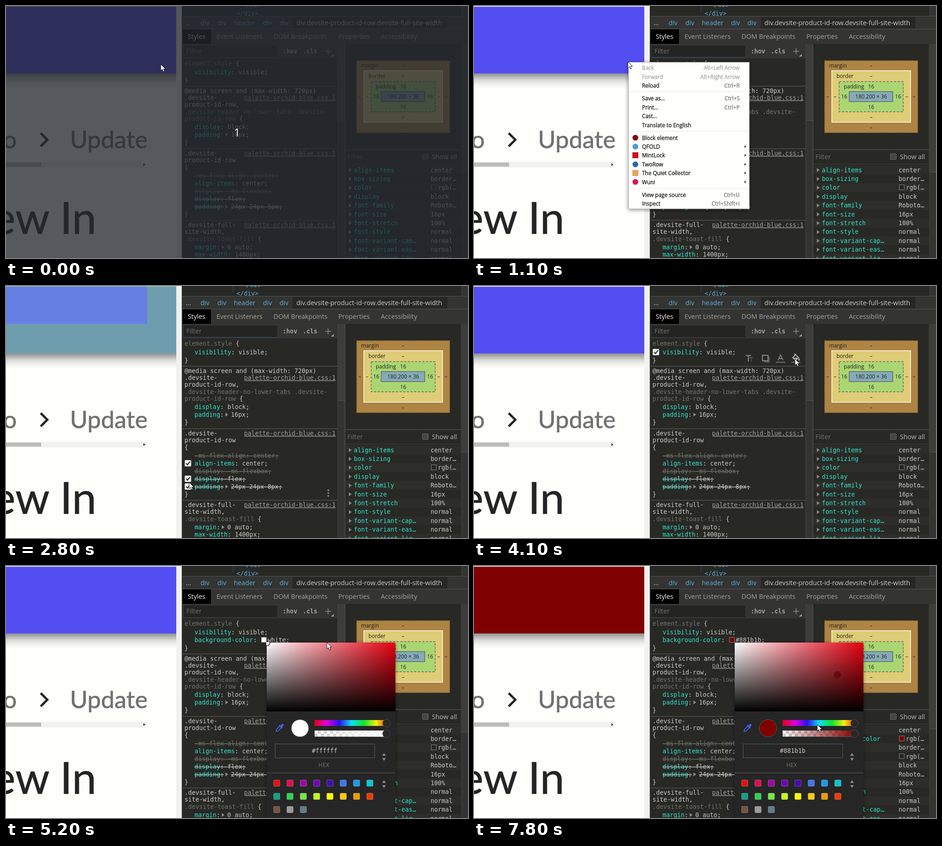
Animation, 1012 px wide and 553 px high, one loop 8 s. Source, as an HTML page:

```html
<!DOCTYPE html>
<html lang="en">
<head>
<meta charset="utf-8">
<title>Picking a background colour</title>
<style>
html, body { margin: 0; width: 100%; height: 100%; overflow: hidden; background: #282825; }
svg { position: fixed; inset: 0; width: 100%; height: 100%; display: block; }
text { white-space: pre; fill: #cbcbc8; }
.ui { font: 14.3px "Open Sans", "Noto Sans", sans-serif; }
.sm { font: 11.7px "Open Sans", "Noto Sans", sans-serif; }
.menu { font: 11.9px "Open Sans", "Noto Sans", sans-serif; stroke-width: .3px; }
.mono { font: 13.33px "DejaVu Sans Mono", monospace; }
.big { font-family: Lato, "Open Sans", sans-serif; stroke-width: .7px; }
.off { fill: #72726f; }
.key { fill: #2ce6ca; }
.val { fill: #c8c8c5; }
.tab { fill: #a3a39f; }
.crumb { fill: #5bb0dd; }
.link { fill: #a0a09c; text-decoration: underline; }
.strike { text-decoration: line-through; }
.box { fill: #222; }
</style>
</head>
<body>
<svg id="stage" viewBox="0 0 1012 553" preserveAspectRatio="none"></svg>
<script>
const BG = '#282825', BAR = '#343432', LINE = '#555552', CHAR = 8.026;
const BLUE = '#524ef1', RED = '#7f0000';

const text = (x, y, s, cls, more = '') => `<text x="${x}" y="${y}" class="${cls}" ${more}>${s}</text>`;
const mid = (x, y, s, cls) => text(x, y, s, cls, 'text-anchor="middle"');
const end = (x, y, s, cls) => text(x, y, s, cls, 'text-anchor="end"');
const rect = (x, y, w, h, fill, more = '') =>
  `<rect x="${x}" y="${y}" width="${w}" height="${h}" fill="${fill}" ${more}/>`;
const circle = (x, y, r, fill, more = '') => `<circle cx="${x}" cy="${y}" r="${r}" fill="${fill}" ${more}/>`;
const path = (d, fill, more = '') => `<path d="${d}" fill="${fill}" ${more}/>`;
const group = (id, body, more = '') => `<g id="${id}" ${more}>${body}</g>`;
const rightTri = (x, y, s, fill) => path(`M${x} ${y - s}l${s * 1.4} ${s}l${-s * 1.4} ${s}z`, fill);
const span = (s, cls) => `<tspan class="${cls}">${s}</tspan>`;
const mono = (x, y, s, cls = '') => text(x, y, s, 'mono ' + cls);
const big = (x, y, s, size, ink, anchor) =>
  text(x, y, s, 'big', `text-anchor="${anchor}" style="font-size:${size}px;fill:${ink};stroke:${ink}"`);

function page() {
  return rect(0, 0, 386, 553, '#fefefb') + rect(373, 0, 13, 553, '#f1f1ee') +
    rect(0, 148, 373, 34, 'url(#shade)') +
    `<rect id="header" x="0" y="1.5" width="373" height="146.5"/>` +
    group('overlay', rect(0, 0, 373, 2, '#a6ccb2') + rect(0, 1.5, 373, 146.5, '#6e9dae') +
      rect(0, 1.5, 309, 81.5, '#667fe3')) +
    big(23.5, 312, 'o', 52, '#717171', 'end') +
    path('M76 279L90.5 293.5L76 308', 'none', 'stroke="#242424" stroke-width="5"') +
    `<g clip-path="url(#crumbs)">${big(140, 312, 'Update', 53, '#717171', 'start')}</g>` +
    rect(0, 342, 308, 12, '#f1f1ef') + rect(0, 343.5, 77, 9, '#bdbdbb') + rightTri(301, 348, 3, '#333') +
    big(198, 500, 'ew In', 96, '#242424', 'end');
}

function toolbars() {
  const crumbs = [[426, 'div'], [463, 'div'], [499, 'header'], [563, 'div'], [599, 'div']];
  const tabs = [[461, 'Event Listeners'], [586, 'DOM Breakpoints'], [728, 'Properties'], [821, 'Accessibility']];
  return rect(385, 0, 627, 553, BG) +
    rect(497, 0, 1, 14, '#45457a') + mono(518, 2, '&lt;/div&gt;', 'crumb') + mono(505, 21, '&lt;/div&gt;', 'crumb') +
    rect(998, 0, 14, 22, BAR) + rect(998, 0, 1, 22, '#4a4a48') +
    rect(386, 22, 626, 29, BAR) + rect(386, 22, 626, 1, LINE) +
    rect(628, 24, 339, 26, BG) + rect(386, 50, 626, 1, LINE) +
    text(394, 42, '…', 'ui', 'font-weight="700"') +
    crumbs.map(([x, s]) => text(x, 42, s, 'ui crumb')).join('') +
    text(636, 42, 'div.devsite-product-id-row.devsite-full-site-width', 'ui') +
    rect(386, 51, 626, 32, BAR) + rect(387, 51, 62, 32, '#000') +
    text(398, 72, 'Styles', 'ui', 'style="fill:#f4f4f4"') +
    tabs.map(([x, s]) => text(x, 72, s, 'ui tab')).join('') +
    rect(386, 83, 340, 32, BAR) + rect(389, 87, 205, 25, '#242422') +
    `<rect id="focus" x="389" y="112" width="205" height="1" fill="#3d5178"/>` +
    text(395, 104, 'Filter', 'ui off') +
    text(606, 104, ':hov', 'mono tab', 'style="font-weight:700"') +
    text(650, 104, '.cls', 'mono tab', 'style="font-weight:700"') +
    path('M699 99.5h13M705.5 93v13', 'none', 'stroke="#8e8e8b" stroke-width="1.6"') +
    path('M718 105v6h-6z', '#9a9a96') +
    rect(386, 51, 1, 502, '#3a3a38');
}

// One declaration; an expandable shorthand gets a small arrow before its value.
function prop(y, name, value, { arrow, strike, off } = {}) {
  const line = strike ? 'strike ' : '';
  const vx = 413 + (name.length + 1) * CHAR;
  const head = span(name, off ? 'off' : 'key') + span(':', off ? 'off' : 'val');
  const tail = span(value + ';', off ? 'off' : 'val');
  if (!arrow) return mono(413, y, head + span(' ', 'off') + tail, line + (off ? 'off' : ''));
  return mono(413, y, head, line) + rightTri(vx + 3.5, y - 4.7, 4.2, '#8d8d89') + mono(vx + 15.5, y, tail, line);
}

const check = y => rect(391.5, y - 12, 14, 14, '#f1f1ef', 'rx="2"') +
  path(`M394.5 ${y - 5}l3 3.2l5.5 -7`, 'none', 'stroke="#333" stroke-width="2.2"');
const dots = y => [0, 6.3, 12.6].map(d => circle(706, y + d, 1.9, '#8b8b88')).join('');
const link = y => end(722, y, 'palette-orchid-blue.css:1', 'mono link');
const rule = y => rect(387, y, 339, 1.3, LINE);

function icons() {
  const c = '#8b8b88';
  return path('M595 152.5h12M601 152.5v13', 'none', `stroke="${c}" stroke-width="2.2"`) +
    path('M603 157h8M607.5 157v9', 'none', 'stroke="#555552" stroke-width="2"') +
    rect(635, 155, 13, 13, '#555552') + rect(632, 152, 12, 12, BG, `stroke="${c}" stroke-width="2"`) +
    path('M666 163l5.3 -12l5.3 12M668 159h7', 'none', `stroke="${c}" stroke-width="1.8"`) +
    rect(661, 166, 21, 2.5, '#666663') +
    path('M698 157l6.5 -6.5l6.5 6.5l-6.5 6.5z', BG, 'stroke="#b5b5b2" stroke-width="1.8"') +
    path('M699 157.5h11l-5.5 6z', '#b5b5b2') + path('M701 148l4 4', 'none', 'stroke="#b5b5b2" stroke-width="1.6"') +
    path('M712 158q3.5 5 0 6q-3.5 -1 0 -6z', '#b5b5b2') + rect(695, 166, 20, 2.5, '#666663');
}

function styles() {
  const first = mono(391, 131, span('element.style', 'off') + ' {') + prop(150, 'visibility', 'visible');
  const rest = mono(391, 168, '}') + rule(175.3) +
    mono(391, 191, '@media screen and (max-width: 720px)') +
    mono(391, 206, '.devsite-') + link(206) + mono(391, 221, 'product-id-row,') +
    mono(391, 237, '.devsite-header-no-lower-tabs .devsite-', 'off') +
    mono(391, 252, span('product-id-row', 'off') + ' {') +
    prop(270, 'display', 'block') + prop(287, 'padding', '16px', { arrow: 1 }) + mono(391, 304, '}') + rule(312.5) +
    mono(391, 328, '.devsite-') + link(328) + mono(391, 343, 'product-id-row') + mono(391, 359, '{') +
    prop(377, '-ms-flex-align', 'center', { strike: 1, off: 1 }) + prop(394, 'align-items', 'center') +
    prop(411, 'display', '-ms-flexbox', { strike: 1, off: 1 }) + prop(428, 'display', 'flex', { strike: 1 }) +
    prop(445, 'padding', '24px 24px 8px', { strike: 1, arrow: 1 }) + mono(391, 462, '}') + rule(469.5) +
    mono(391, 485, '.devsite-full-') + link(485) + mono(391, 500, 'site-width,') +
    mono(391, 516, span('.devsite-toast-fill', 'off') + ' {') +
    prop(534, 'margin', '0 auto', { arrow: 1 }) + prop(550, 'max-width', '1400px');
  const added = mono(413, 167, span('background-color', 'key') + ':') +
    `<rect id="chip" x="559.5" y="156.5" width="11" height="11" stroke="#8a8a86"/>` +
    `<text id="colour" x="573" y="167" class="mono val"></text>`;
  return first + group('added', added) + group('rest', rest) +
    group('hover0', check(150) + icons()) + group('tick0', check(150) + check(167)) +
    group('hover1', check(270) + check(287) + dots(284)) +
    group('hover2', check(394) + check(428) + check(445) + dots(448)) +
    rect(726, 83, 17, 470, BAR) + rect(726, 83, 1, 470, '#454543') +
    rect(727, 84, 15, 168, '#3d3d3b') + rect(727, 251, 15, 1, LINE) + rect(742, 83, 1.3, 470, LINE);
}

function boxModel() {
  const marks = [[870, 135], [870, 158], [870, 248], [870, 271], [775, 203], [791, 203], [948, 203], [964, 203]];
  const pads = [[870, 181], [811, 203], [929, 203], [870, 226]];
  return rect(743.5, 83, 254, 470, BG) +
    rect(767.7, 119.7, 204.6, 158.6, '#ad8443', 'stroke="#5d4b2c" stroke-width="1.4" stroke-dasharray="4 3"') +
    rect(783.8, 142, 172.4, 113, '#dfcc76', 'stroke="#f4efdd" stroke-width="1.8"') +
    rect(799.8, 165.8, 140.4, 66.4, '#aad672', 'stroke="#74756c" stroke-width="1.7" stroke-dasharray="5 3"') +
    rect(821.8, 187.8, 95.4, 22, '#85abb6', 'stroke="#6d6f74" stroke-width="1.7"') +
    text(778, 135, 'margin', 'sm box') + text(794, 158, 'border', 'sm box') + text(810, 181, 'padding', 'sm box') +
    marks.map(([x, y]) => mid(x, y, '–', 'sm box')).join('') +
    pads.map(([x, y]) => mid(x, y, '16', 'sm box')).join('') +
    mid(870, 203, '180.200 × 36', 'sm box');
}

function computed(red) {
  const rows = [['align-items', 'center'], ['box-sizing', 'border…'], ['color', 'rgb(…', BG], ['display', 'block'],
    ['font-family', 'Roboto…'], ['font-size', '16px'], ['font-stretch', '100%'], ['font-style', 'normal'],
    ['font-variant-cap…', 'normal'], ['font-variant-eas…', 'normal'], ['font-variant-lig…', 'normal']];
  if (red) rows.splice(1, 0, ['background-color', 'rgb(…', RED]);
  return rows.map(([name, value, chip], i) => {
    const y = 364.5 + i * 19.42;
    return rect(744, y - 14.5, 253, 19.4, i % 2 ? BG : '#2d2d2a') + rightTri(751, y - 4.5, 4.5, '#858581') +
      mono(762, y, name, 'key') +
      (chip ? rect(931.5, y - 11, 11, 11, chip, 'stroke="#858581"') : '') + mono(chip ? 946 : 930, y, value, 'val');
  }).join('') + rect(997, 84, 15, red ? 274 : 281, '#3d3d3b') + rect(997, red ? 357 : 364, 15, 1, LINE);
}

function sidePane() {
  return boxModel() + rect(743, 314.5, 254, 1.3, LINE) + text(748, 336, 'Filter', 'ui off') +
    rect(912, 324, 13, 13, '#454543', 'stroke="#6a6a67" rx="2"') + text(933, 336, 'Show all', 'ui', 'style="fill:#b9b9b6"') +
    rect(743, 346.5, 254, 1, '#40403e') + rect(997, 83, 15, 470, BAR) + rect(996.5, 83, 1, 470, '#454543') +
    group('plain', computed(false)) + group('tinted', computed(true));
}

// [baseline, label, shortcut, icon colour, round icon]
const ITEMS = [[140, 'Back', 'Alt+Left Arrow'], [159.5, 'Forward', 'Alt+Right Arrow'], [179, 'Reload', 'Ctrl+R'],
  [207, 'Save as…', 'Ctrl+S'], [226.5, 'Print…', 'Ctrl+P'], [246, 'Cast…'], [265.5, 'Translate to English'],
  [293.5, 'Block element', '', '#7d0a14', 1], [313, 'QFOLD', '', '#4d9bd6', 1], [332, 'MintLock', '', '#c9141e', 0],
  [352, 'TwoRow', '', '#2d68b8', 1], [371, 'The Quiet Collector', '', '#e5a45c', 0], [390.5, 'Wuni', '', '#dc1450', 1],
  [418.5, 'View page source', 'Ctrl+U'], [438, 'Inspect', 'Ctrl+Shift+I']];

function menu() {
  const ink = c => `style="fill:${c};stroke:${c}"`;
  const rows = ITEMS.map(([y, label, keys, icon, round], i) => {
    const disabled = i < 2;
    const mark = !icon ? '' : round ? circle(353.5, y - 4.5, 6.3, icon) : rect(347, y - 11, 13, 13, icon);
    return text(368, y, label, 'menu', ink(disabled ? '#a2a2a0' : '#141414')) + mark +
      (keys ? text(582, y, keys, 'menu', 'text-anchor="end" ' + ink(disabled ? '#a2a2a0' : '#747472')) : '') +
      (i > 7 && i < 13 ? rightTri(592.5, y - 4.5, 3, '#444') : '');
  });
  return rect(338.5, 123.5, 264.5, 321.5, '#fffffd', 'stroke="#b4b4b2" filter="url(#drop)"') +
    `<rect id="lit" x="339" width="264" height="19.5" fill="#e8e8e6"/>` +
    [187.5, 274.5, 399.5].map(y => rect(339, y, 264, 1, '#e2e2e0')).join('') + rows.join('');
}

const SWATCHES = [
  '#df1414 #df0f52 #9b0ba6 #7208b4 #4a0cb2 #3f77ee #1c9bec #12c3d0'.split(' '),
  '#14a084 #2fd250 #72e845 #c3fd1e #fdfb08 #fdc912 #ee9b0c #ee3b08'.split(' '),
  '#785542 #9b9b99 #5f7d8a'.split(' ')];

function picker() {
  const knob = y => circle(833.5, y, 8.5, BG, 'stroke="#4c4c49"');
  const updown = y => path(`M824 ${y}l4 -6l4 6zM824 ${y + 5}l4 6l4 -6z`, '#8f8f8b');
  const dropper = path('M-2.3 -4h4.6v12l-2.3 3l-2.3 -3z', 'none', 'stroke="#3d64d8" stroke-width="1.8"') +
    rect(-5, -4.5, 10, 2.6, '#3d64d8') + rect(-2.8, -11, 5.6, 7, '#3d64d8', 'rx="2.5"');
  return rect(571, 168, 282, 400, BG, 'filter="url(#drop)"') +
    rect(571, 168, 282, 151, 'url(#tint)') + rect(571, 168, 282, 151, 'url(#dark)') +
    `<g clip-path="url(#pick)"><circle id="drag" r="7" stroke="#262626" stroke-width="1.6"/></g>` +
    `<g transform="translate(599.5 355) rotate(45)">${dropper}</g>` +
    `<circle id="sample" cx="644" cy="356" r="19" stroke="#5a5a57"/>` +
    rect(676, 338, 162, 13, 'url(#hue)') +
    rect(676, 361, 162, 13.5, 'url(#checks)') + rect(676, 361, 162, 13.5, 'url(#alpha)') +
    knob(345) + knob(368) +
    rect(589.5, 390.5, 218, 30.5, 'none', 'stroke="#5f5f5c"') +
    `<text id="hex" x="698" y="410" class="mono" text-anchor="middle"></text>` +
    text(696, 441, 'HEX', 'ui off', 'text-anchor="middle" style="font-size:12.6px"') +
    updown(416.5) + rect(571, 453.5, 282, 1.2, LINE) + updown(476) +
    SWATCHES.map((row, r) => group('row' + r, row.map((c, i) =>
      rect(586 + i * 29.15, 469.5 + r * 29, 14, 14, c, 'rx="2" stroke="#fff" stroke-opacity=".25"')).join(''))).join('');
}

function defs() {
  const stops = list => list.map(([o, c, a = 1]) => `<stop offset="${o}" stop-color="${c}" stop-opacity="${a}"/>`).join('');
  const grad = (id, list, down) =>
    `<linearGradient id="${id}" x2="${down ? 0 : 1}" y2="${down ? 1 : 0}">${stops(list)}</linearGradient>`;
  const hues = ['#e60010', '#e000e0', '#2a12ee', '#10e0f0', '#10e030', '#f4f010', '#e81808'];
  const clip = (id, x, y, w, h) => `<clipPath id="${id}">${rect(x, y, w, h, '#000')}</clipPath>`;
  return '<defs>' +
    grad('shade', [[0, '#000', .43], [.2, '#000', .3], [.45, '#000', .14], [.7, '#000', .05], [1, '#000', 0]], 1) +
    grad('tint', [[0, '#fff'], [.5, '#ee7a84'], [1, '#e60010']]) +
    grad('dark', [[0, '#000', 0], [1, '#000', 1]], 1) +
    grad('hue', hues.map((c, i) => [i / 6, c])) +
    '<linearGradient id="alpha"><stop id="clear" offset="0" stop-opacity="0"/><stop id="solid" offset="1"/></linearGradient>' +
    `<pattern id="checks" x="676" y="361" width="13.5" height="13.5" patternUnits="userSpaceOnUse">` +
    rect(0, 0, 14, 14, '#fff') + rect(6.75, 0, 6.75, 6.75, '#ccc') + rect(0, 6.75, 6.75, 6.75, '#ccc') + '</pattern>' +
    '<filter id="drop" x="-10%" y="-10%" width="120%" height="120%"><feDropShadow dx="0" dy="2" stdDeviation="4" flood-opacity=".45"/></filter>' +
    clip('crumbs', 140, 260, 168, 70) + clip('pick', 570, 167, 283, 152) + '</defs>';
}

const ARROW = path('M0 0V14L3.3 11L5.7 16.3L8.2 15.2L5.9 10.2H10.3Z', '#fff', 'stroke="#1a1a1a"');
const HAND = path('M-1.5 1q1.5 -2 3 0v4l6 1q2 .5 1.8 3l-1 5h-7.5l-4.5 -5q0 -2 2.2 -1z', '#fff', 'stroke="#1a1a1a"') +
  path('M2.5 8v3M5 8v3M7.3 8.5v2.5', 'none', 'stroke="#1a1a1a" stroke-width=".8"');

document.getElementById('stage').innerHTML = defs() + page() + toolbars() + styles() + sidePane() +
  group('menu', menu()) + group('picker', picker()) +
  rect(0, 0, 1012, 553, 'rgb(36,39,46)', 'id="dim"') +
  text(506, 286, '1', 'ui', 'id="count" text-anchor="middle" style="font-size:24px;fill:#fff"') +
  group('cursor', group('arrow', ARROW) + group('hand', HAND));

const el = {};
document.querySelectorAll('#stage [id]').forEach(n => el[n.id] = n);
const show = (id, on) => el[id].setAttribute('visibility', on ? 'visible' : 'hidden');
const set = (id, name, v) => el[id].setAttribute(name, v);

// Pointer positions: time, x, y
const TRACK = [[0, 339, 128], [700, 339, 128], [800, 337, 122], [1400, 337, 122], [1900, 397, 406], [2000, 397, 406],
  [2100, 400, 428], [2700, 400, 428], [2800, 401, 431], [3200, 520, 262], [3300, 520, 262], [3900, 702, 159],
  [4000, 702, 159], [4100, 703, 160], [5100, 703, 160], [5200, 703, 168], [5400, 864, 230], [5700, 796, 237],
  [7000, 796, 237], [7300, 777, 296], [7400, 777, 296], [7800, 752, 348], [8000, 752, 348]];

function pointer(t) {
  const i = TRACK.findIndex(k => k[0] > t);
  const [t0, x0, y0] = TRACK[i - 1], [t1, x1, y1] = TRACK[i];
  const u = (t - t0) / (t1 - t0), e = u * u * (3 - 2 * u);
  return [x0 + (x1 - x0) * e, y0 + (y1 - y0) * e];
}

function draw(time) {
  const t = Math.floor(time / 100) * 100;
  const [x, y] = pointer(t);
  const red = t >= 6200, added = t >= 4300, open = t >= 4400;
  const colour = red ? RED : '#ffffff';

  set('dim', 'opacity', t < 500 ? .77 : t < 600 ? .4 : 0);
  show('count', t < 500);
  show('focus', t >= 600 && t < 3400);

  show('menu', t >= 1100 && t < 2600);
  set('menu', 'opacity', t >= 2500 ? .5 : 1);
  const lit = x > 339 ? ITEMS.find(k => Math.abs(k[0] - 4.5 - y) < 10) : null;
  show('lit', lit && t >= 1500 && t < 2600);
  if (lit) set('lit', 'y', lit[0] - 14);

  const hovering = t >= 2800 && t < 5200;
  const section = !hovering ? -1 : y < 176 ? 0 : y < 313 ? 1 : 2;
  show('hover0', section === 0 && !added);
  show('tick0', section === 0 && added);
  show('hover1', section === 1);
  show('hover2', section === 2);
  show('overlay', section > 0);
  set('header', 'fill', red ? RED : BLUE);

  show('added', added);
  set('rest', 'transform', `translate(0 ${added ? 17 : 0})`);
  set('chip', 'fill', colour);
  el.colour.textContent = red ? '#881b1b;' : 'white;';
  show('plain', !red);
  show('tinted', red);

  show('picker', open);
  [4700, 4800, 5000].forEach((start, r) => show('row' + r, t >= start));
  set('drag', 'cx', red ? 796 : 571);
  set('drag', 'cy', red ? 239 : 168);
  set('drag', 'fill', colour);
  set('sample', 'fill', colour);
  set('clear', 'stop-color', colour);
  set('solid', 'stop-color', colour);
  el.hex.textContent = red ? '#881b1b' : '#ffffff';

  const hand = t >= 6200 && t < 7100;
  set('cursor', 'transform', `translate(${x.toFixed(1)} ${y.toFixed(1)})`);
  show('arrow', !hand);
  show('hand', hand);
}

// Rows inherit their parent's visibility until the picker opens.
const start = performance.now();
function tick() {
  draw((performance.now() - start) % 8000);
  requestAnimationFrame(tick);
}
tick();
</script>
</body>
</html>
```
